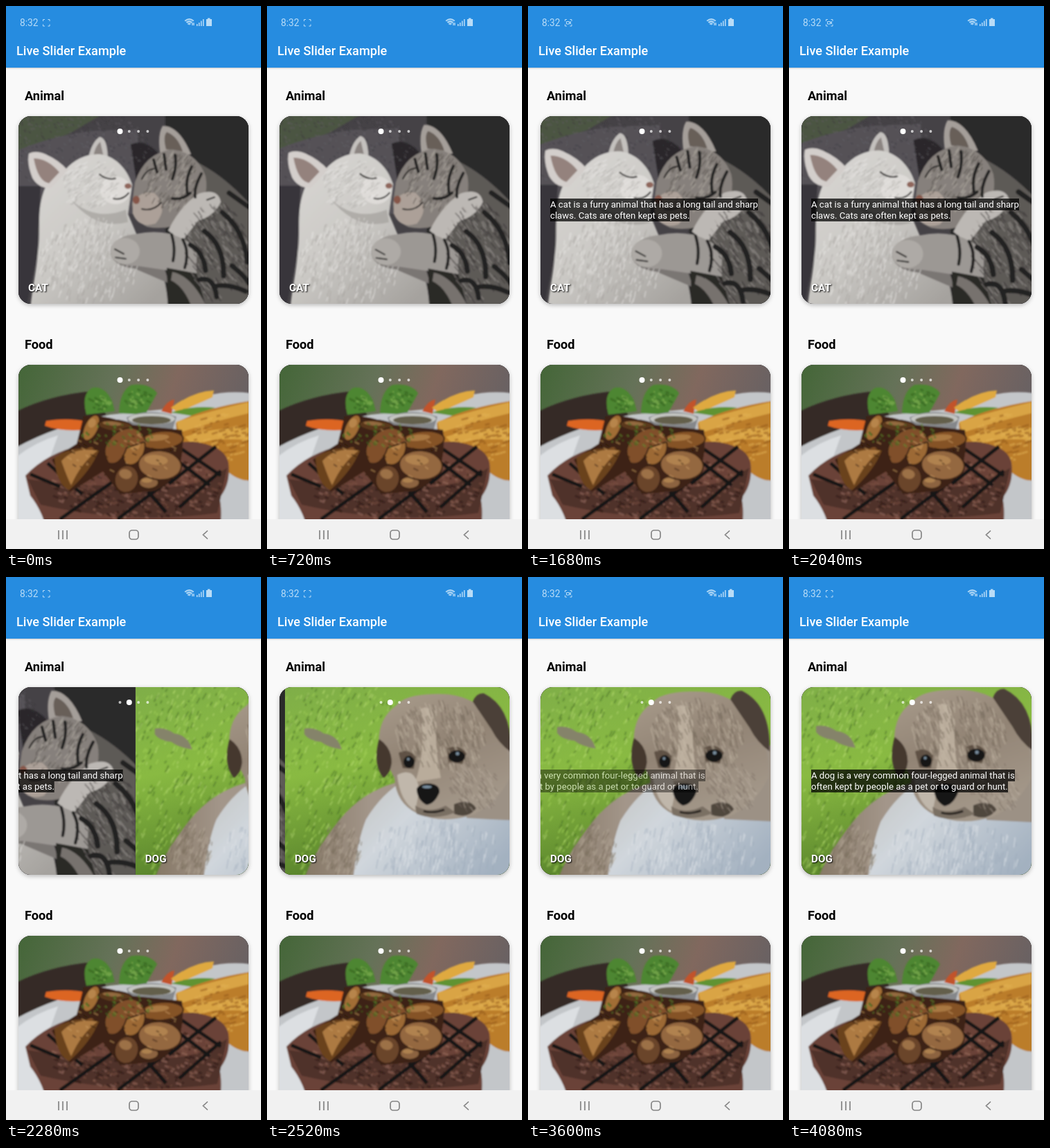
An HTML page that plays this animation: 368x784 px, repeating every 4.2 s.

```html
<!DOCTYPE html>
<html lang="en">
<head>
<meta charset="utf-8">
<title>Live Slider Example</title>
<style>
html, body { margin: 0; width: 100%; height: 100%; overflow: hidden; background: #f9f9f9; }
body { position: relative; font-family: Roboto, sans-serif; }
header, nav, .chrome, .card, .page, .page > svg, .dots, h2, .label, .info { position: absolute; }
header { left: 0; top: 0; width: 368px; height: 89px; background: #268ce0; box-shadow: 0 1px 2px #0003; }
nav { left: 0; top: 741px; width: 368px; height: 43px; background: #f1f1f1; }
.chrome { left: 0; top: 0; width: 368px; height: 784px; }
h2 { left: 27px; margin: 0; font-size: 18.2px; line-height: 22px; color: #000; }
.card { left: 18px; width: 332px; height: 271px; border-radius: 18px; overflow: hidden; background: #333; }
.shade { box-shadow: 0 2px 6px #0004; }
.page { left: 0; top: 0; width: 332px; height: 271px; overflow: hidden; }
.page > svg { left: 0; top: 0; width: 332px; height: 271px; }
.dots { left: 0; top: 0; width: 332px; height: 40px; }
.label { left: 14px; top: 239px; font-weight: 700; font-size: 15.3px; line-height: 18px; color: #fff; text-shadow: 1px 1px 2px #000; }
.info { left: 14px; top: 119px; font-size: 13.2px; line-height: 16px; color: #fff; white-space: nowrap; }
.info span { display: block; width: fit-content; background: #000b; }
.info span:first-child { padding-top: 1px; }
</style>
</head>
<body>
<h2 style="top:119px">Animal</h2>
<h2 style="top:478px">Food</h2>

<div class="card shade" style="top:159px"></div>
<div class="card" style="top:159px">
  <div class="page" id="cat">
    <svg viewBox="18 159 332 271">
      <rect x="18" y="159" width="332" height="271" fill="#454246"/>
      <g filter="url(#soft)">
        <path d="M10 150H150L92 184 40 204 10 214Z" fill="#4c5443"/>
        <path d="M18 208Q70 186 130 180L190 178V300H18Z" fill="#545156"/>
        <path d="M230 150H360V440H230Z" fill="#2b292a"/>
        <path d="M10 260H50L45 360 28 440H10Z" fill="#38363a"/>
        <path d="M180 200Q200 190 222 215L190 265Z" fill="#29272a"/>
        <g id="blanket"></g>

        <path d="M118 225Q122 198 135 189Q147 190 147 225Z" fill="#c4c1be"/>
        <path d="M126 218Q128 203 136 196L141 218Z" fill="#8c8582"/>
        <path d="M60 255C42 290 51 320 46 355C43 390 38 405 35 440H234C233 395 222 365 195 345L176 300L182 258C174 232 155 216 135 214C116 213 98 222 86 236Z" fill="url(#silver)"/>
        <path d="M92 278Q128 312 173 294L176 312Q130 325 92 278Z" fill="#a4a19d" opacity=".7"/>
        <path d="M196 345L150 352Q152 376 185 379L234 400Q230 365 196 345Z" fill="#7a7673"/>
        <path d="M33 213Q43 208 57 214Q77 223 89 237L65 263Q47 264 38 248Q30 228 33 213Z" fill="#d3cecb"/>
        <path d="M40 220Q60 220 77 240L62 256Q46 253 40 220Z" fill="#94827d"/>
        <ellipse cx="158" cy="266" rx="22" ry="20" fill="#dedbd8"/>
        <g id="whiteFur"></g>

        <path d="M258 218Q305 235 350 284V440H252L236 380Q220 350 240 325Z" fill="#5d5a57"/>
        <path d="M224 222Q217 188 226 173Q250 173 267 214Z" fill="#a49e99"/>
        <path d="M231 207Q226 188 232 182Q248 188 255 210Z" fill="#675e59"/>
        <path d="M186 255Q200 212 240 207Q276 212 288 246Q294 280 270 302Q240 326 204 319Q184 310 182 286Z" fill="#86807b"/>
        <path d="M183 283Q195 266 214 270Q236 290 216 314Q192 322 183 300Z" fill="#aca098"/>
        <path d="M234 324Q252 288 278 271Q306 262 310 283Q300 304 277 310L254 340Z" fill="#bcb8b4"/>
        <path d="M275 350Q240 318 188 329Q153 333 151 354Q158 376 188 375L275 388Z" fill="#9c9894"/>
        <ellipse cx="172" cy="354" rx="21" ry="19" fill="#aeaaa6"/>
        <path d="M232 378L275 386 290 440H234Z" fill="#2b2928"/>
        <path d="M240 384Q270 390 292 440H270Q258 405 238 396Z" fill="#77726e"/>
        <g id="tabbyFur"></g>

        <g fill="none" stroke="#242221" stroke-linecap="round">
          <path stroke-width="7" d="M266 345Q285 355 288 382M286 325Q315 345 314 390M312 298Q345 325 348 370M300 405Q320 400 346 412M280 395Q300 390 304 420M322 270L350 290M326 375Q345 390 350 400"/>
          <path stroke-width="4" d="M239 330Q245 350 241 368M255 337Q265 355 258 378M268 232Q258 250 262 272M282 242Q271 262 273 276M244 215Q247 232 240 250M228 214L231 236M213 222L218 240M240 278Q255 280 266 270"/>
          <path stroke-width="2" d="M135 243Q146 252 158 249M155 278Q168 281 177 270M196 250Q203 235 214 235M196 293Q212 297 224 284M157 351L170 358M158 363L173 365M290 280L301 276"/>
        </g>
        <ellipse cx="176" cy="260" rx="5" ry="4" fill="#8f665b"/>
        <ellipse cx="188" cy="280" rx="5" ry="6" fill="#86564a"/>
      </g>
    </svg>
    <div class="label">CAT</div>
    <div class="info"><span>A cat is a furry animal that has a long tail and sharp</span><span>claws. Cats are often kept as pets.</span></div>
  </div>

  <div class="page" id="dog">
    <svg viewBox="18 159 332 271">
      <rect x="18" y="159" width="332" height="271" fill="url(#grass)"/>
      <g filter="url(#soft)">
        <g id="blades"></g>
        <path d="M46 219Q60 216 74 226Q94 228 100 249Q80 246 70 238Q52 236 46 227Z" fill="#85836a"/>
        <path d="M44 440Q62 390 105 341Q140 304 190 294L240 440Z" fill="url(#back)"/>
        <path d="M116 440Q122 382 135 350Q158 312 190 294L360 290V440Z" fill="url(#chest)"/>
        <path d="M296 260L360 240V352Q318 350 280 348Z" fill="#9c9185"/>
        <path d="M154 247Q150 206 178 186Q190 170 232 169Q288 166 318 205Q346 246 342 290Q325 326 290 343Q246 358 208 341Q178 326 176 290Z" fill="url(#face)"/>
        <path d="M214 190Q232 182 237 215Q234 250 243 290L206 296Q222 250 214 190Z" fill="#b9ac9b"/>
        <path d="M180 286Q206 272 212 308L206 337Q184 324 180 286Z" fill="#c0b7ab"/>
        <path d="M154 234Q172 246 172 268Q170 285 160 290Q144 270 154 234Z" fill="#44372f"/>
        <path d="M289 180Q294 167 305 168Q346 188 344 253Q326 240 316 220Z" fill="#4c4038"/>
        <path d="M182 254Q194 246 207 259L204 277 188 276ZM252 248Q269 239 280 255L274 270 254 267Z" fill="#5f5144"/>
        <path d="M262 328Q285 318 294 334Q282 350 262 342Z" fill="#4f463e"/>
        <path d="M206 330Q226 342 250 330L264 340Q234 352 208 342Z" fill="#7a6f64"/>
        <g id="dogFur"></g>
        <g fill="#161719">
          <ellipse cx="197" cy="267" rx="8" ry="9"/>
          <ellipse cx="266" cy="259" rx="12" ry="9"/>
          <path d="M208 306Q213 297 227 298Q242 300 241 311Q234 328 222 329Q209 322 208 306Z"/>
        </g>
        <path d="M218 338Q231 342 248 336" fill="none" stroke="#27221f" stroke-width="3"/>
        <g fill="#788c9c"><circle cx="196" cy="263" r="2"/><circle cx="267" cy="255" r="2.5"/><ellipse cx="223" cy="303" rx="7" ry="2"/></g>
      </g>
    </svg>
    <div class="label">DOG</div>
    <div class="info"><span>A dog is a very common four-legged animal that is</span><span>often kept by people as a pet or to guard or hunt.</span></div>
  </div>
  <svg class="dots" id="animalDots"></svg>
</div>

<div class="card shade" style="top:518px"></div>
<div class="card" style="top:518px">
  <div class="page">
    <svg viewBox="18 518 332 271">
      <rect x="18" y="518" width="332" height="271" fill="url(#room)"/>
      <g filter="url(#soft)">
        <path d="M10 588Q60 562 125 556L150 600 10 650Z" fill="#342b26"/>
        <path d="M10 640Q70 606 150 590L250 580Q300 550 360 560V800H10Z" fill="#c3c6c9"/>
        <path d="M10 655Q40 630 75 620L50 690 65 800H10Z" fill="#dcdfe2"/>
        <path d="M116 590Q108 560 125 551Q142 548 153 570L157 585ZM163 588Q164 556 181 547Q208 544 218 559L201 590Z" fill="#4e8630"/>
        <g id="leaves"></g>
        <path d="M58 599Q90 594 116 600L113 612Q80 615 56 606Z" fill="#dc6524"/>
        <path d="M224 585Q233 569 243 568L239 589Z" fill="#c2532c"/>
        <path d="M238 580Q270 556 300 555L298 565 248 587Z" fill="#dfa940"/>
        <path d="M238 587Q270 576 302 580L270 592Z" fill="#609331"/>
        <path d="M245 602Q285 580 360 569V684Q338 690 315 668L248 635Z" fill="#bb7d2b"/>
        <path d="M246 600Q290 586 350 572V588Q300 600 250 616ZM258 622Q300 608 350 609V627Q300 622 270 634Z" fill="#d9a445"/>
        <g id="fries"></g>
        <path d="M174 594Q207 579 246 593L240 614H180Z" fill="#85878a"/>
        <ellipse cx="210" cy="596" rx="34" ry="8" fill="#c4c6c2"/><ellipse cx="210" cy="598" rx="28" ry="6" fill="#645e4c"/>
        <path d="M28 678Q59 645 110 634L270 629Q316 635 321 659Q325 690 308 710Q315 735 302 800H65Q62 740 35 707Z" fill="#6a4337"/>
        <path d="M31 683Q120 697 185 690Q260 706 319 667L305 732Q180 750 50 720Z" fill="#4f322a"/>
        <g id="meat"></g>
        <path d="M35 676L78 694M60 660L110 705M78 741L165 679M161 741L240 681M254 640L310 678M239 650L294 692M303 636L235 690M205 701L231 731M250 724L310 671" fill="none" stroke="#191412" stroke-width="5"/>
        <path d="M112 592Q150 590 175 604L254 612Q262 680 215 700L165 705 140 672 92 702 66 655 102 632Z" fill="#3c2414"/>
        <g id="mushrooms" stroke="#3b2212" stroke-width="2"></g>
        <path d="M148 628Q160 610 181 609Q199 612 201 629L174 638Q165 665 148 660Q137 642 148 628Z" fill="#80502a" stroke="#3b2212" stroke-width="2"/>
        <path d="M70 652Q98 632 134 642Q122 672 91 699Q72 690 70 652Z" fill="#6b431f"/>
        <path d="M80 657Q98 636 132 642Q108 660 94 692Q88 680 80 657Z" fill="#ad7a42"/>
        <g id="herbs"></g>
      </g>
    </svg>
  </div>
  <svg class="dots" id="foodDots"></svg>
</div>

<header></header>
<nav></nav>
<svg class="chrome" viewBox="0 0 368 784" fill="none">
  <defs>
    <filter id="soft" x="-10%" y="-10%" width="120%" height="120%"><feGaussianBlur stdDeviation=".8"/></filter>
    <linearGradient id="grass" x2=".3" y2="1"><stop stop-color="#7fae48"/><stop offset=".45" stop-color="#89ba42"/><stop offset="1" stop-color="#557f2a"/></linearGradient>
    <linearGradient id="silver" x2=".8" y2="1"><stop stop-color="#dad8d5"/><stop offset=".5" stop-color="#cccac6"/><stop offset="1" stop-color="#a5a29e"/></linearGradient>
    <linearGradient id="back"><stop stop-color="#857765"/><stop offset=".5" stop-color="#a3968a"/></linearGradient>
    <linearGradient id="chest" y2=".6"><stop stop-color="#c3c3c0"/><stop offset=".4" stop-color="#d0d6dc"/><stop offset="1" stop-color="#a3b1c0"/></linearGradient>
    <linearGradient id="face" x2=".4" y2="1"><stop stop-color="#a99c8c"/><stop offset=".5" stop-color="#928475"/><stop offset="1" stop-color="#a39789"/></linearGradient>
    <linearGradient id="room" y2=".3"><stop stop-color="#446638"/><stop offset=".4" stop-color="#657258"/><stop offset=".65" stop-color="#81685e"/><stop offset="1" stop-color="#656063"/></linearGradient>
  </defs>
  <text x="15" y="71" font-size="18.15" font-weight="500" fill="#fff">Live Slider Example</text>
  <g fill="#b9dcf7">
    <text x="20" y="29" font-size="13.8">8:32</text>
    <path d="M258 21Q264.500 16 271 21L264.500 28Z" opacity=".4"/>
    <path d="M275 26h1.500v3h-1.500zM278 24h1.500v5h-1.500zM281 21.500h1.500v7.500h-1.500zM284 19h1.500v10h-1.500zM289 19h2v-1.500h3.500V19H297v10h-8z"/>
  </g>
  <g stroke="#b9dcf7">
    <path d="M258 21.500Q264.500 16 271 21.500M260.500 24Q264.500 20.500 268 24M262.500 26.500Q264.500 24.500 266 26.500M269 24v4M271 28v-4" stroke-width="1.300"/>
    <path d="M53.500 22v-2.500h2.500M60.500 19.500h2.500V22M63 26.500V29h-2.500M56 29h-2.500v-2.500"/>
    <path id="camera" d="M55.500 22.500h4v3.500h-4zM59.500 24l2-1.500v3.500z"/>
  </g>
  <g stroke="#858585" stroke-width="1.700">
    <path d="M76 757v13M82 757v13M88 757v13M291 757.500l-6.500 6 6.500 6"/>
    <rect x="178" y="757" width="13" height="13" rx="4"/>
  </g>
</svg>

<script>
const $ = id => document.getElementById(id);
const LOOP = 4200, STEP = 120, WIDTH = 332;
let seed = 7;
const random = () => (seed = seed * 16807 % 2147483647) / 2147483647;

// Short strokes spread over an ellipse, one path per colour.
function scatter(id, count, cx, cy, rx, ry, dx, dy, colors, width = 1.5) {
  for (const color of colors) {
    let d = '';
    for (let i = 0; i < count; i++) {
      const a = random() * 2 * Math.PI, r = Math.sqrt(random()), k = .5 + random();
      d += `M${(cx + rx * r * Math.cos(a)).toFixed(1)} ${(cy + ry * r * Math.sin(a)).toFixed(1)}l${(dx * k + random() * 3 - 1.5).toFixed(1)} ${(dy * k).toFixed(1)}`;
    }
    $(id).innerHTML += `<path d="${d}" fill="none" stroke="${color}" stroke-width="${width}" opacity=".5"/>`;
  }
}
scatter('blanket', 240, 100, 205, 110, 60, 2, 2, ['#69656a', '#39363a']);
scatter('whiteFur', 200, 122, 365, 72, 62, -2, 7, ['#eceae7', '#a5a29e']);
scatter('whiteFur', 90, 125, 255, 42, 34, -5, 4, ['#eceae7', '#b0ada9']);
scatter('tabbyFur', 140, 300, 350, 46, 70, 5, 7, ['#a39e99', '#2c2928']);
scatter('tabbyFur', 90, 238, 257, 42, 42, 4, -6, ['#b8b1aa', '#4c4643']);
scatter('blades', 260, 95, 295, 125, 150, 3, -6, ['#a8d65a', '#426b22', '#b7da76'], 2);
scatter('dogFur', 150, 242, 225, 65, 48, 3, 9, ['#c8bbaa', '#6d6053']);
scatter('dogFur', 60, 290, 300, 36, 34, 5, 7, ['#beb2a3', '#74685c']);
scatter('dogFur', 110, 235, 390, 95, 42, -2, 11, ['#e4e8ec', '#9caaba']);
scatter('dogFur', 70, 100, 390, 30, 38, -3, 8, ['#b8ab99', '#716453']);
scatter('leaves', 14, 132, 570, 15, 12, 4, 2, ['#90bd5c', '#2d5a20'], 3);
scatter('leaves', 18, 190, 567, 20, 14, 4, 2, ['#90bd5c', '#2d5a20'], 3);
scatter('fries', 60, 306, 625, 40, 36, 7, -2, ['#e3b457', '#8f5718'], 3);
scatter('meat', 130, 185, 695, 122, 46, 5, 2, ['#a27566', '#261713', '#7d5143'], 3);

for (const [x, y, rx, ry, turn, color] of [
  [123, 609, 10, 20, 25, '#a16d35'], [115, 649, 17, 9, -40, '#83532a'],
  [225, 627, 31, 13, -5, '#855225'], [185, 642, 14, 22, 25, '#9c6935'], [158, 606, 25, 8, 5, '#5a391c'],
  [174, 683, 17, 20, 15, '#6a442c'], [206, 688, 14, 9, 0, '#8c643f'], [222, 663, 31, 21, 5, '#94673f']
]) $('mushrooms').innerHTML += `<g transform="translate(${x} ${y}) rotate(${turn})"><ellipse rx="${rx}" ry="${ry}" fill="${color}"/><ellipse cx="${-rx / 5}" cy="${-ry / 3}" rx="${rx * .55}" ry="${ry * .35}" fill="#ce9d61" stroke="none" opacity=".5"/></g>`;
scatter('herbs', 24, 165, 645, 80, 40, 5, 3, ['#d0a169', '#2f1a0d'], 2);
scatter('herbs', 22, 160, 618, 55, 18, 3, 3, ['#3d6d22', '#5f8a30'], 3);

const dots = active => [0, 1, 2, 3].map(i =>
  `<circle cx="${146.5 + i * 13.3}" cy="22" r="${i === active ? 4 : 2}" fill="#fff" opacity="${i === active ? 1 : .7}"/>`).join('');
$('foodDots').innerHTML = dots(0);

const clamp = v => Math.max(0, Math.min(1, v));
const ease = v => (1 - Math.cos(Math.PI * clamp(v))) / 2;

function showPage(id, x, zoomTime, infoTime) {
  const page = $(id), info = page.querySelector('.info'), p = ease(infoTime / 400);
  page.style.transform = `translateX(${x}px)`;
  page.querySelector('svg').style.transform = `scale(${1 + .08 * ease(zoomTime / 2800)})`;
  info.style.transform = `translateX(${(p - 1) * WIDTH / 2}px)`;
  info.style.opacity = p;
}

let shownDot;
function draw(t) {
  const slide = 1 - (1 - clamp((t - 2204) / 600)) ** 5;
  showPage('cat', -slide * WIDTH, t, t - 1018);
  showPage('dog', (1 - slide) * WIDTH, t - 2450, t - 3380);
  const dot = slide > 0 ? 1 : 0;
  if (dot !== shownDot) $('animalDots').innerHTML = dots(shownDot = dot);
  $('camera').style.opacity = Math.floor((t + 940) / 1000) % 2 || t < STEP ? 0 : 1;
  if (t < 1060) $('camera').style.opacity = 0;
}

const start = performance.now();
function tick() {
  const t = (performance.now() - start) % LOOP;
  draw(Math.floor(t / STEP) * STEP);
  requestAnimationFrame(tick);
}
tick();
</script>
</body>
</html>
```
